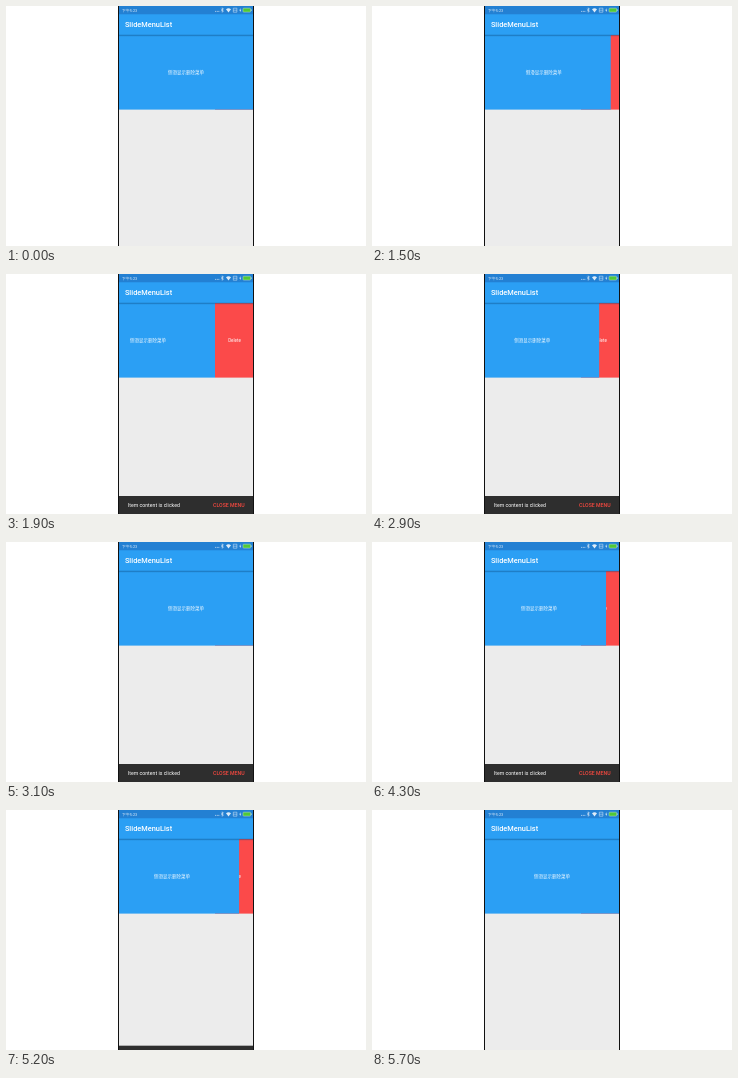
An HTML page for the animation above (6 s loop, 360 by 240 pixels).

```html
<!DOCTYPE html>
<html lang="zh">
<head>
<meta charset="utf-8">
<title>SlideMenuList</title>
<style>
html, body { margin: 0; width: 100%; height: 100%; overflow: hidden; background: #fff; }
svg { display: block; width: 100%; height: 100%; }
text { font-family: Roboto, "Noto Sans CJK SC", "Noto Sans CJK", sans-serif; fill: #fff; }
.mid { text-anchor: middle; }
.bold { font-weight: 500; }
</style>
</head>
<body>
<svg viewBox="0 0 360 240">
  <defs>
    <clipPath id="screen"><rect x="113" width="134" height="240"/></clipPath>
    <linearGradient id="shade" x2="0" y2="1">
      <stop offset="0" stop-color="#0b4a80" stop-opacity=".6"/>
      <stop offset="1" stop-color="#0b4a80" stop-opacity="0"/>
    </linearGradient>
  </defs>
  <rect width="360" height="240" fill="#fff"/>
  <rect x="112" width="136" height="240" fill="#111"/>
  <g clip-path="url(#screen)">
    <rect x="113" width="134" height="240" fill="#ececec"/>

    <!-- list row: menu underneath, content on top -->
    <rect x="209" y="29" width="38" height="74.6" fill="#fb4a4a"/>
    <text class="mid" x="228.5" y="67.9" font-size="4.5">Delete</text>
    <g id="row">
      <rect x="113" y="29" width="134" height="74.6" fill="#2b9ff4"/>
      <text class="mid" x="180" y="67.9" font-size="4.5" fill-opacity=".9">侧滑显示删除菜单</text>
    </g>

    <!-- app bar -->
    <rect x="113" width="134" height="29" fill="#2b9ff4"/>
    <rect x="113" y="28.8" width="134" height="2" fill="url(#shade)"/>
    <text class="bold" x="118.9" y="21.3" font-size="7.4">SlideMenuList</text>

    <!-- status bar -->
    <rect x="113" width="134" height="8.3" fill="#2380d3"/>
    <g opacity=".85">
      <text x="116" y="5.7" font-size="3.9">下午5:23</text>
      <path d="M209.2 5.4h.9m.7 0h.9m.7 0h.9" stroke="#fff" stroke-width=".8"/>
      <path d="M215.2 2.8l2.2 2.3-1.1 1.2V1.8l1.1 1.1-2.2 2.3" fill="none" stroke="#fff" stroke-width=".6"/>
      <path d="M220 3.3q2.5-2 5 0L222.5 6.4z" fill="#fff"/>
      <path d="M227.3 2.2h3.6v4h-3.6zM227.3 4.2h3.6" fill="none" stroke="#fff" stroke-width=".5"/>
      <path d="M234.6 2l-1.4 2.4h1l-.4 2 1.5-2.6h-1z" fill="#fff"/>
    </g>
    <rect x="237" y="2.2" width="7.6" height="3.9" rx=".8" fill="#51c936" stroke="#b9dcc9" stroke-width=".5"/>
    <rect x="244.9" y="3.4" width=".8" height="1.5" fill="#b9dcc9"/>

    <g id="snack">
      <rect x="113" y="222" width="134" height="18" fill="#2e2e2e"/>
      <text x="121.9" y="232.7" font-size="5.2">Item content is clicked</text>
      <text class="bold" x="238.6" y="232.7" font-size="5.2" text-anchor="end" style="fill:#f4483f">CLOSE MENU</text>
    </g>
  </g>
</svg>
<script>
const LOOP = 6000, STEP = 100, MENU = 38, BAR = 18;
const row = document.getElementById('row');
const snack = document.getElementById('snack');

// Eased progress from 0 to 1 between two times
function ease(t, from, to, power) {
  const p = Math.min(1, Math.max(0, (t - from) / (to - from)));
  return 1 - Math.pow(1 - p, power);
}

function draw(time) {
  const t = Math.floor((time % LOOP) / STEP) * STEP;
  const open = ease(t, 1400, 1900, 1.1) - ease(t, 2800, 3100, 1.6)
             + ease(t, 4200, 4600, 1.45) - ease(t, 5000, 5400, 1.45);
  const shown = ease(t, 1500, 1900, 2) - ease(t, 5000, 5300, 1.3);
  row.setAttribute('transform', `translate(${-MENU * open} 0)`);
  snack.setAttribute('transform', `translate(0 ${BAR * (1 - shown)})`);
}

const start = performance.now();
function tick() {
  draw(performance.now() - start);
  requestAnimationFrame(tick);
}
tick();
</script>
</body>
</html>
```
